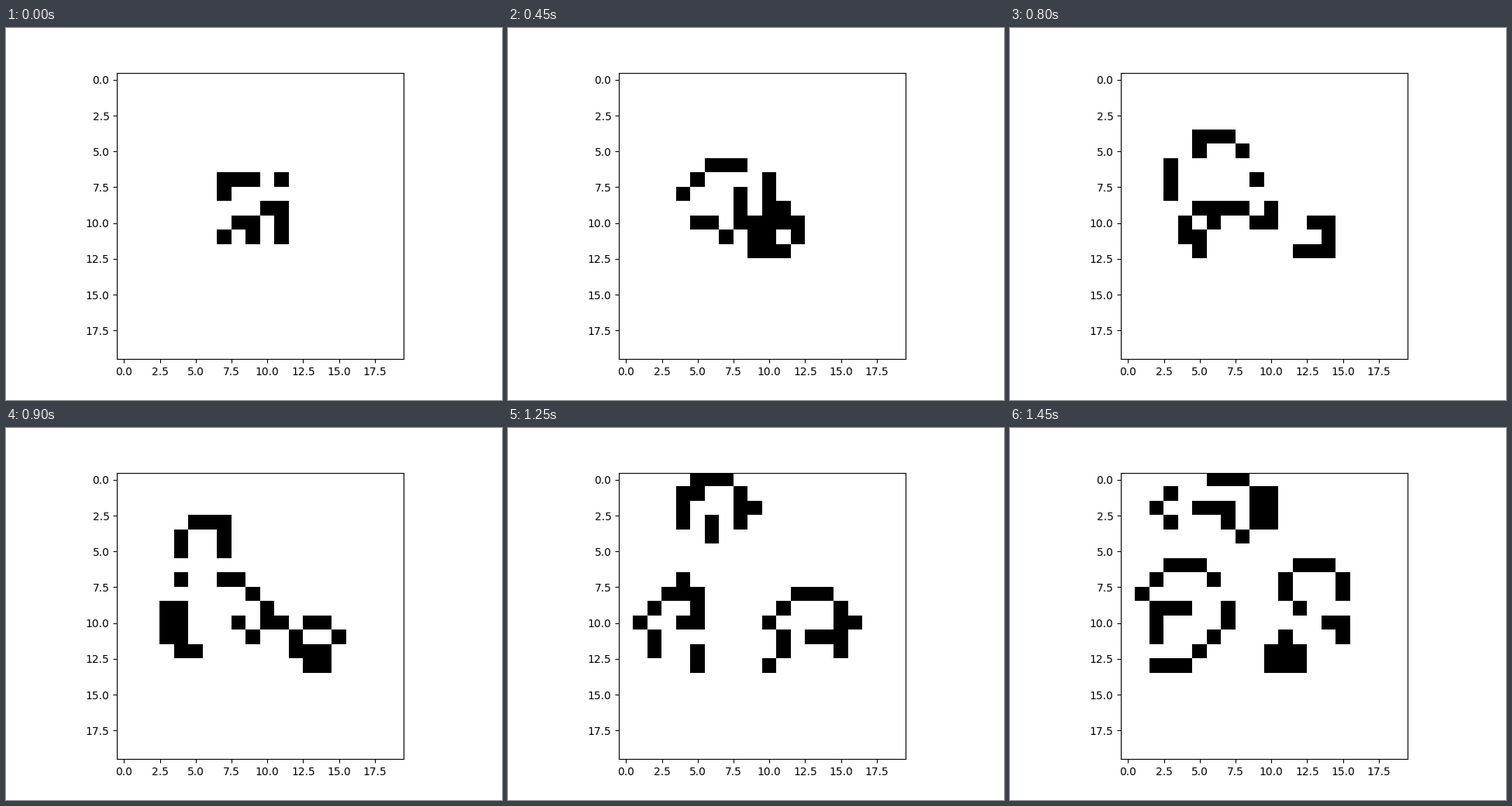
Write a matplotlib script that moves like this. It is 640x480 px and loops after 1.5 s.

```python
import numpy as np
import matplotlib.pyplot as plt
from matplotlib.animation import FuncAnimation

SIZE = 20
FRAMES = 30
INTERVAL = 50
SEED = ["11101", "10000", "00011", "01101", "10101"]


def start_grid():
    grid = np.zeros((SIZE, SIZE), dtype=int)
    grid[7:12, 7:12] = [[int(c) for c in row] for row in SEED]
    return grid


def step(grid):
    """One Game of Life generation; cells beyond the border are dead."""
    padded = np.pad(grid, 1)
    block = sum(padded[r:r + SIZE, c:c + SIZE]
                for r in range(3) for c in range(3))
    # A block sum of 3 means birth or survival, 4 keeps the cell as it is.
    return ((block == 3) | ((block == 4) & (grid == 1))).astype(int)


generations = [start_grid()]
while len(generations) < FRAMES:
    generations.append(step(generations[-1]))

fig, ax = plt.subplots(figsize=(6.4, 4.8), dpi=100)
image = ax.imshow(generations[0], cmap="binary", vmin=0, vmax=1)


def draw(i):
    image.set_data(generations[i])
    return [image]


anim = FuncAnimation(fig, draw, frames=FRAMES, interval=INTERVAL, repeat=True)
plt.show()
```
